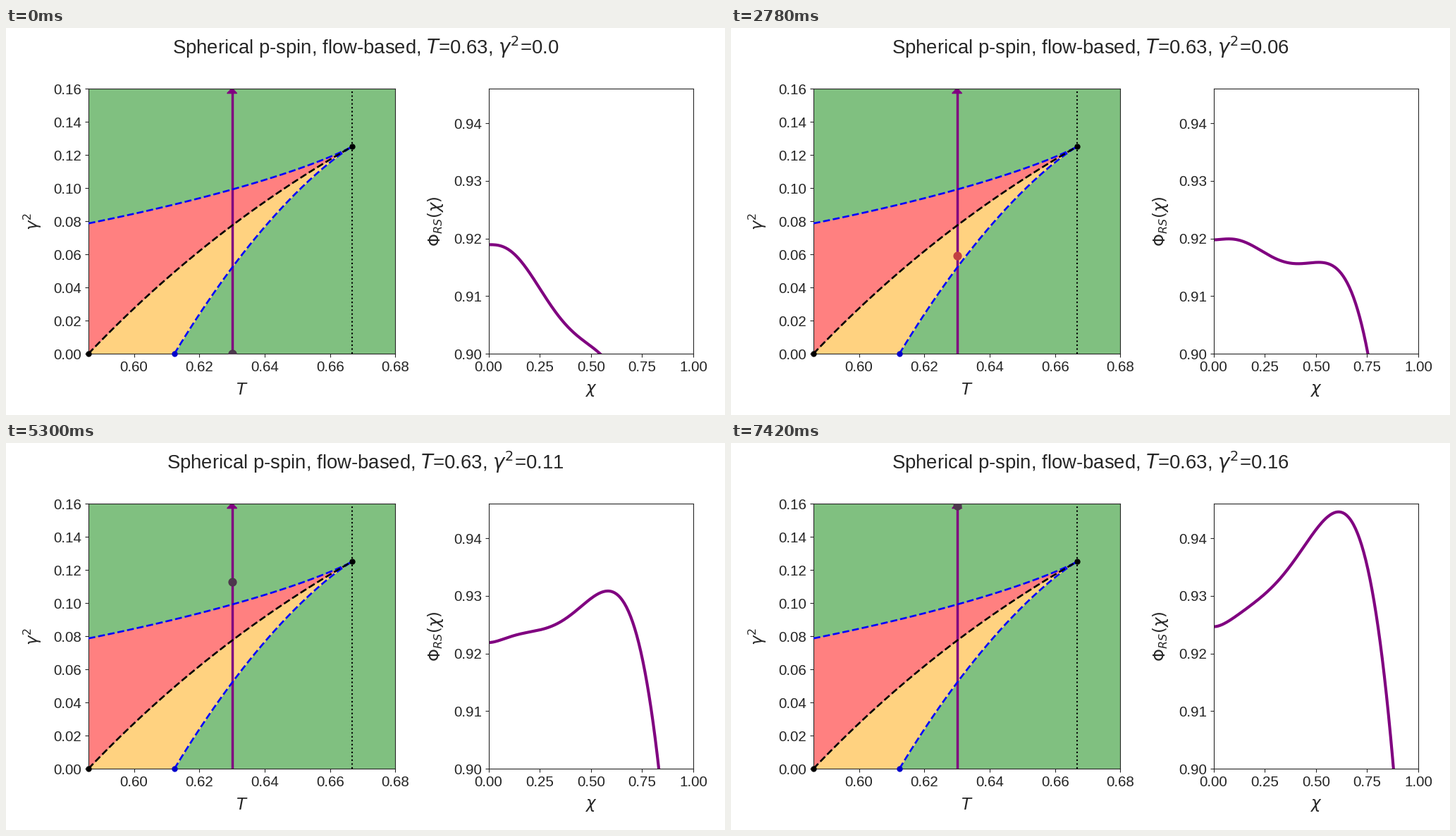
Animation, 1020 px wide and 549 px high, one loop 7440 ms. Source, as a matplotlib script:

```python
import numpy as np
import matplotlib.pyplot as plt
from matplotlib.animation import FuncAnimation

W, H, DPI = 1020, 549, 100
INK = "0.15"
T_K, T_D, T_C = 0.58606, np.sqrt(3 / 8), 2 / 3
T_RUN = 0.63
STEPS = 160
TICKS = 372                              # 20 ms each
HOLD = (0, 1, 1, 1, 1, 1, 2)             # three steps per seven ticks: 20, 100, 20 ms

plt.rcParams.update({
    "font.family": "Liberation Sans", "mathtext.fontset": "dejavusans",
    "text.color": INK, "axes.edgecolor": INK, "xtick.color": INK,
    "ytick.color": INK, "xtick.labelsize": 14.9, "ytick.labelsize": 14.9,
})


def free_entropy(chi, gamma2, T):
    """Replica-symmetric potential of the spherical 3-spin model."""
    snr = gamma2 + 1.5 * chi**2 / T**2
    return 0.5 * (np.log(2 * np.pi) + snr - np.log1p(snr)) - chi**3 / (2 * T**2)


def spinodal(chi):
    return np.sqrt(3 * chi) * (1 - chi), chi * (1 - 2 * chi) / (2 * (1 - chi)**2)


def branch(T, start, stop):
    temps, gammas = spinodal(np.linspace(start, stop, 400))
    return np.interp(T, temps, gammas)


def transition(T):
    """Field at which the two maxima of the potential are equally high."""
    low, high = branch(T, 0.66, 1 / 3), branch(T, 0.05, 1 / 3)
    a = 1.5 / T**2
    for _ in range(28):
        mid = (low + high) / 2
        roots = np.sort(np.roots([-a, a, -(mid + 1), mid]).real)
        first, _, last = free_entropy(roots, mid, T)
        low, high = (low, mid) if last > first else (mid, high)
    return mid


def axes_px(left, top, right, bottom):
    return fig.add_axes([left / W, 1 - bottom / H, (right - left) / W, (bottom - top) / H])


def text_px(x, y, s, size, **kw):
    return fig.text(x / W, 1 - y / H, s, fontsize=size, ha="center", **kw)


# The tiny offset keeps the pixel size from being rounded down.
fig = plt.figure(figsize=(W / DPI + 1e-9, H / DPI + 1e-9), dpi=DPI, facecolor="white")

# Phase diagram
phase = axes_px(117, 86.3, 552.4, 462)
phase.set(xlim=(T_K, 0.68), ylim=(0, 0.16), facecolor="#80c080",
          xticks=0.60 + 0.02 * np.arange(5), yticks=0.02 * np.arange(9))
phase.xaxis.set_major_formatter("{x:.2f}")
phase.yaxis.set_major_formatter("{x:.2f}")

temps = np.linspace(T_K, T_C, 50)
upper = branch(temps, 0.05, 1 / 3)
lower = branch(temps, 0.66, 1 / 3)
middle = np.array([transition(T) for T in temps[:-1]] + [0.125])
phase.fill_between(temps, middle, upper, color="#ff8080", lw=0, zorder=1)
phase.fill_between(temps, lower, middle, color="#ffd280", lw=0, zorder=1)

lower_temps = np.linspace(T_D, T_C, 50)
phase.plot([T_C, T_C], [0, 0.16], ":", color="black", lw=1.5)
phase.plot([T_RUN, T_RUN], [0, 0.16], color="purple", lw=2.5, zorder=2.5)
phase.fill([T_RUN - 0.0015, T_RUN + 0.0015, T_RUN], [0.1573, 0.1573, 0.1604],
           fc="purple", ec="purple", lw=1, zorder=2.5)
phase.plot(temps, upper, "--", color="blue", lw=1.9, zorder=3)
phase.plot(lower_temps, branch(lower_temps, 0.66, 1 / 3), "--", color="blue", lw=1.9, zorder=3)
phase.plot(temps, middle, "--", color="black", lw=1.9, zorder=3)
for x, y, color in ((T_K, 0, "black"), (T_D, 0, "#0000cc"), (T_C, 0.125, "black")):
    phase.plot(x, y, "o", ms=5, color=color, clip_on=False, zorder=4)
dot, = phase.plot([T_RUN], [0], "o", ms=7.8, zorder=2.8)

# Potential
potential = axes_px(684.6, 86.3, 975, 462)
potential.set(xlim=(0, 1), ylim=(0.9, 0.946), xticks=np.linspace(0, 1, 5),
              yticks=(0.90, 0.91, 0.92, 0.93, 0.94))
potential.xaxis.set_major_formatter("{x:.2f}")
potential.yaxis.set_major_formatter("{x:.2f}")
chi = np.linspace(0, 1, 200)
curve, = potential.plot(chi, chi, color="purple", lw=3)

title = text_px(510, 37, "", 19.8)
text_px(334.5, 520, "$T$", 16.5)
text_px(829.5, 517.5, r"$\chi$", 16.5)
text_px(37.5, 274, r"$\gamma^2$", 16.5, rotation=90, va="center")
text_px(609, 274, r"$\Phi_{RS}(\chi)$", 16.5, rotation=90, va="center")

edges = branch(T_RUN, 0.66, 1 / 3), branch(T_RUN, 0.05, 1 / 3)


def update(tick):
    step = min(3 * (tick // 7) + HOLD[tick % 7], STEPS - 1)
    gamma2 = step / 1000
    dot.set_ydata([gamma2])
    dot.set_color("#c24141" if edges[0] < gamma2 < edges[1] else "#4d384d")
    curve.set_ydata(free_entropy(chi, gamma2, T_RUN))
    title.set_text(f"Spherical p-spin, flow-based, $T$=0.63, $\\gamma^2$={np.round(gamma2, 2)}")
    return dot, curve, title


anim = FuncAnimation(fig, update, frames=TICKS, interval=20, repeat=True, repeat_delay=0)
plt.show()
```
